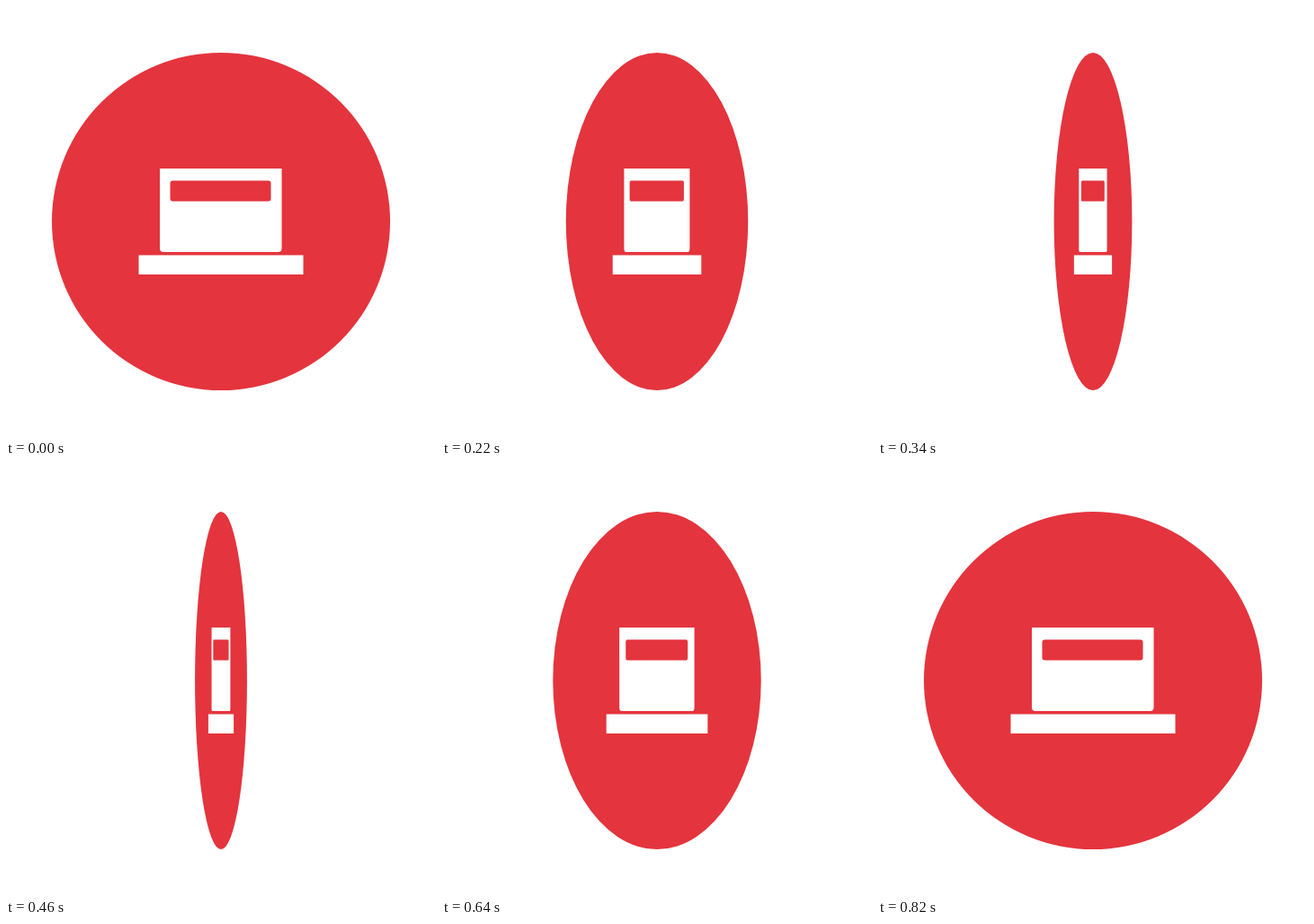
These frames come from a looping animation (478x480 px, 920 ms). An HTML page:

```html
<!DOCTYPE html>
<html>
<head>
<meta charset="utf-8">
<style>
  html, body { margin: 0; width: 100%; height: 100%; overflow: hidden; background: #fff; }
  svg { display: block; width: 478px; height: 480px; }
</style>
</head>
<body>
<svg viewBox="0 0 478 480">
  <g id="badge" fill="#fff">
    <circle r="188" fill="#e4343d"/>
    <path d="M-68-59H67.5V30q0 4-4 4H-64q-4 0-4-4Z"/>
    <rect x="-56.5" y="-45.5" width="112" height="23" rx="3" fill="#e4343d"/>
    <rect x="-91.5" y="37.5" width="183" height="21.5"/>
  </g>
</svg>
<script>
  const LOOP = 920, HOLD = 100, STEP = 60, SPAN = 13, TURN = 6;
  const badge = document.getElementById('badge');

  // The badge narrows linearly, then opens again and rests at full width.
  function widthAt(time) {
    const step = time < HOLD ? 0 : Math.min(SPAN, 1 + Math.floor((time - HOLD) / STEP));
    return step <= TURN ? 1 - 2 * step / SPAN : Math.min(1, 2 * (step - TURN) / SPAN);
  }

  function draw(now) {
    badge.setAttribute('transform', `translate(239 240) scale(${widthAt(now % LOOP)} 1)`);
  }

  const start = performance.now();
  function tick() {
    draw(performance.now() - start);
    requestAnimationFrame(tick);
  }
  tick();
</script>
</body>
</html>
```
